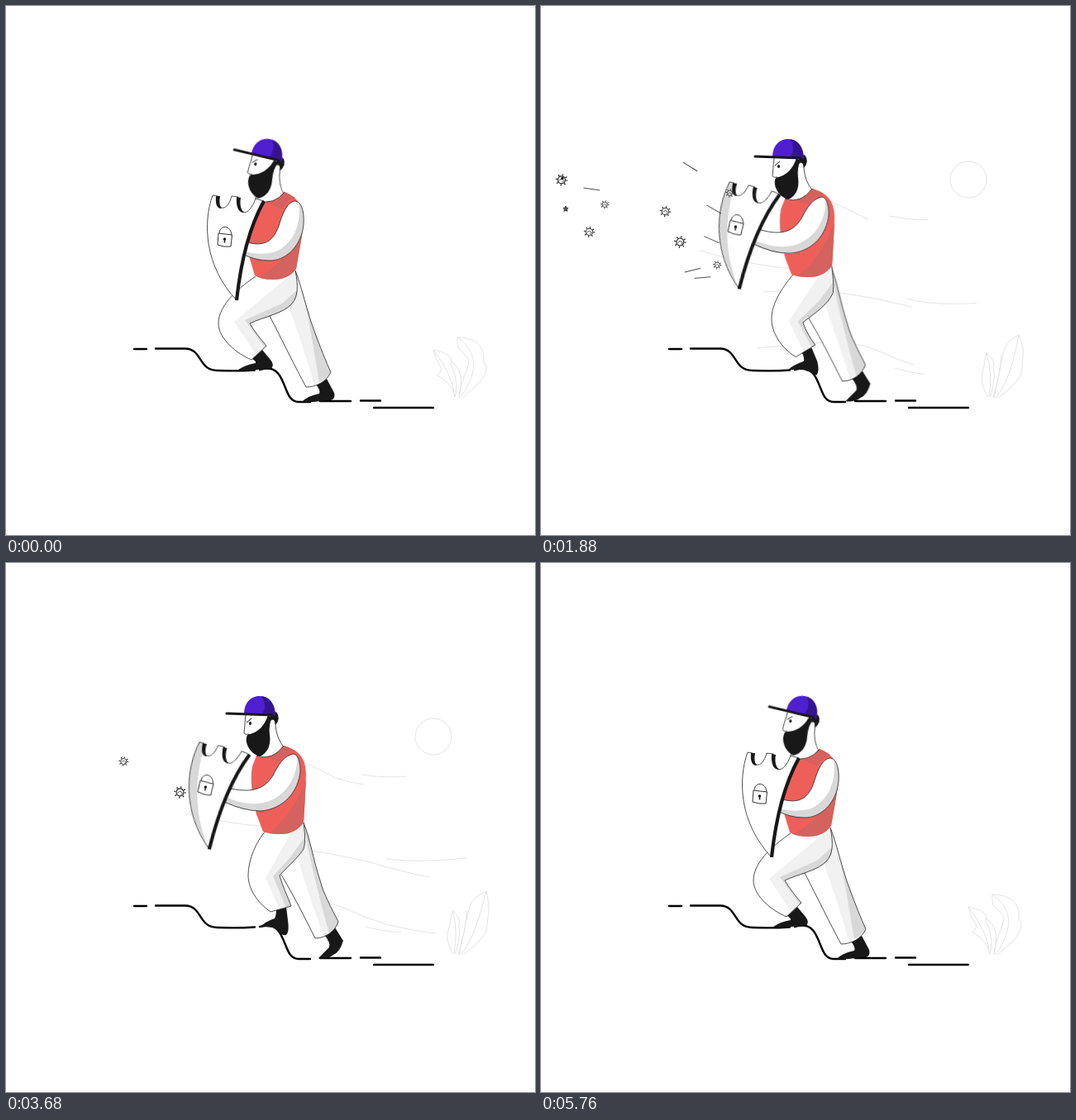
Animation, 640 px wide and 640 px high, one loop 5780 ms. Source, as an HTML page without scripts:

```html
<!DOCTYPE html>
<html lang="en">
<head>
<meta charset="utf-8">
<title>Shield bearer</title>
<style>
html, body { margin: 0; width: 100%; height: 100%; overflow: hidden; background: #fff; }
svg { display: block; width: 100%; height: 100%; }
path, line, circle { vector-effect: none; }

/* body parts morph between three poses: rest (a), lean (x), brace (d) */
.m, .hd, .sh, .legs, .top { animation: 5.78s ease-in-out infinite; }
.m { animation-name: morph; }
.hd { animation-name: head; transform-origin: 307px 172px; }
.sh { animation-name: shield; transform-origin: 264.5px 292.5px; }
.legs { animation-name: lean; --lean: -11.5px; }
.top { animation-name: lean; --lean: -9.5px; }
@keyframes morph {
  0%, 99.65%, 100% { d: var(--a); }
  25.26% { d: var(--x, var(--d)); }
  50.52%, 71.97% { d: var(--d); }
}
@keyframes lean {
  0%, 50.52%, 100% { transform: translate(0, 0); }
  25.26% { transform: translate(var(--lean), 0); }
}
@keyframes head {
  0%, 99.65%, 100% { transform: translate(10.5px, 0) rotate(11.5deg); }
  25.26% { transform: translate(-9.6px, 0) rotate(0deg); }
  50.52%, 71.97% { transform: translate(0, 0) rotate(0deg); }
}
@keyframes shield {
  0%, 99.65%, 100% { transform: translate(0, 0) rotate(0deg); }
  25.26% { transform: translate(-31.7px, -15.8px) rotate(7.9deg); }
  50.52%, 71.97% { transform: translate(-24.5px, -11px) rotate(7.7deg); }
}

/* background */
.faint { fill: none; stroke: #e4e4e4; stroke-width: 1; }
.leaf path { animation: sway 5.78s linear infinite; }
@keyframes sway {
  0%, 99.65%, 100% { d: var(--a); }
  18.7%, 78.9% { d: var(--x); }
  50.2% { d: var(--d); }
}
.wind path, .sun { stroke-dasharray: 100 200; }
.wind path { animation: wind 5.78s ease-in-out infinite; }
.sun { animation: sun 5.78s linear infinite; }
@keyframes wind {
  0% { stroke-dashoffset: 100; }
  50.5% { stroke-dashoffset: 0; }
  99.65%, 100% { stroke-dashoffset: -100; }
}
@keyframes sun {
  0%, 2.8% { stroke-dashoffset: 100; }
  21.5%, 77.5% { stroke-dashoffset: 0; }
  96.2%, 100% { stroke-dashoffset: -100; }
}

/* attackers: end at (x, y) after covering (w, h), starting at t */
.fly use { --w: 250; --s: 1; animation: fly 5.78s linear var(--t) infinite backwards; }
.fly .s { --w: 400; rotate: atan2(var(--h), var(--w)); }
@keyframes fly {
  0% { translate: calc((var(--x) - var(--w)) * 1px) calc((var(--y) - var(--h)) * 1px); }
  0%, 21.3% { scale: var(--s); }
  22%, 100% { translate: calc(var(--x) * 1px) calc(var(--y) * 1px); scale: 0; }
}

.ink { stroke: #222; stroke-width: .8; stroke-linejoin: round; }
.w { fill: #fff; }
.n { fill: none; }
.k { fill: #181818; }
.g1 { fill: #f1f1f1; }
.g2 { fill: #d8d8d8; }
.red { fill: #ef5f5a; }
.dim { fill: #d4625e; }
.ground { fill: none; stroke: #000; stroke-width: 2.4; stroke-linecap: round; }
</style>
</head>
<body>
<svg viewBox="0 0 640 640">
<defs>
  <g id="v" fill="none" stroke="#222">
    <circle r="4.5" stroke-width="1.1"/>
    <circle r="6.2" stroke-width="2.2" stroke-dasharray="1.2 3.67"/>
    <path d="M-3 1Q0-3 3 1M1 3L3 1" stroke-width=".9"/>
  </g>
  <path id="star" d="M0-3L1-1L3-1L1.4.6L2 3L0 1.6L-2 3L-1.4.6L-3-1L-1-1Z" fill="#666" stroke="#222"/>
  <circle id="dot" r="1.7" fill="#111"/>
  <line id="l" x1="-10" x2="10" stroke="#444" stroke-width=".9"/>
</defs>

<g class="faint leaf">
  <path style="--a:path('M543 473C540 460 532 452 522 447Q530 440 524 434Q519 425 517 416C534 420 541 424 538 434C544 444 547 460 543 473');--x:path('M541 473C533 462 528 452 529 445Q529 440 530 434Q529 425 531 415C540 421 548 427 545 436C549 447 547 462 543 473');--d:path('M540 473C536 460 536 452 540 445Q543 440 544 436Q546 430 549 426C550 431 553 433 550 440C551 450 546 462 544 473')"/>
  <path style="--a:path('M543 473Q540 445 517 416');--x:path('M542 473Q545 445 531 415');--d:path('M542 473Q549 450 549 426')"/>
  <path style="--a:path('M548 474Q556 440 538 430');--x:path('M547 474Q556 445 552 430');--d:path('M547 474Q555 450 563 412')"/>
  <path style="--a:path('M548 474C549 455 560 440 560 428Q552 418 547 414Q545 406 546 401C566 402 580 408 578 432Q584 434 579 446C572 460 560 465 553 474');--x:path('M548 474C550 455 556 442 555 432Q556 424 559 418Q558 408 564 400C574 408 584 414 579 430Q584 436 580 446C574 460 562 467 553 474');--d:path('M549 474C551 455 556 446 557 436Q562 424 563 412Q572 400 596 395C590 404 588 418 586 430Q582 436 582 444C574 458 562 467 553 474')"/>
  <path style="--a:path('M550 474C562 455 580 425 546 401');--x:path('M550 474C565 455 570 430 564 400');--d:path('M551 474C565 455 575 430 596 395')"/>
</g>
<path class="faint sun" pathLength="100" d="M517 188a22 22 0 0 0 0 44a22 22 0 0 0 0-44"/>
<g class="faint wind">
  <path pathLength="100" d="M300 214Q365 242 397 259Q415 266 433 268"/>
  <path pathLength="100" d="M421 254Q452 261 485 258"/>
  <path pathLength="100" d="M192 296Q280 322 360 320"/>
  <path pathLength="100" d="M269 346C340 340 390 350 444 363Q480 374 512 380"/>
  <path pathLength="100" d="M443 354Q480 365 557 357"/>
  <path pathLength="100" d="M261 414C330 408 370 400 410 418Q460 442 520 448"/>
  <path pathLength="100" d="M428 438Q450 445 478 447"/>
</g>

<path class="ground" d="M155 415H170M181 414.5H217C238 415 232 441 256 441Q280 442 301 440.5M307 440C318 437 325 438 331 447C340 461 340 479 354 479H368M380 478H417M429 477.5H453M445 486H517"/>

<!-- back leg -->
<g class="legs">
  <path class="m k" style="--a:path('M375 458L388 451L397 468Q399 475 393 477Q380 478 372 479Q365 479 358 479Q364 472 379 469Q381 465 375 458Z');--d:path('M386 451L398 441L408 457Q404 471 396 474Q391 478 386 478Q382 479 378 478Q384 472 391 465Q393 460 386 451Z')"/>
  <path class="m w" style="--a:path('M350 320C358 340 364 370 374 396C380 412 387 430 393 443C388 454 376 461 363 461C350 437 334 404 319 375L340 350Z');--d:path('M360 314C368 334 372 360 380 384C384 400 394 418 402 434C398 446 386 454 374 454C362 430 348 402 333 377L350 350Z')"/>
  <path class="m g1" style="--a:path('M338 352C350 385 362 420 373 459Q388 454 393 443C387 430 380 412 374 396C364 370 358 340 350 320Z');--d:path('M350 345C358 380 372 415 384 452Q398 446 402 434C394 418 384 400 380 384C372 360 368 334 360 314Z')"/>
  <path class="m g2" style="--a:path('M350 320C362 350 370 400 379 455Q390 449 393 443C387 430 380 412 374 396C364 370 358 340 350 320Z');--d:path('M360 314C365 350 378 400 391 448Q400 441 402 434C394 418 384 400 380 384C372 360 368 334 360 314Z')"/>
  <path class="m ink n" style="--a:path('M350 320C358 340 364 370 374 396C380 412 387 430 393 443C388 454 376 461 363 461C350 437 334 404 319 375');--d:path('M360 314C368 334 372 360 380 384C384 400 394 418 402 434C398 446 386 454 374 454C362 430 348 402 333 377')"/>
</g>

<!-- front leg -->
<path class="m k" style="--a:path('M298 427L310 416L320 428Q325 434 321 439Q311 440 302 440Q290 440 281 440Q290 434 302 432Q303 430 298 427Z');--x:path('M313 419L325 413L333 430Q336 442 332 446Q325 441 316 440Q306 440 297 440Q304 434 316 430Q318 426 313 419Z');--d:path('M327 419L339 416L341 432Q343 446 339 450Q333 452 326 442Q316 439 307 441Q313 434 325 430Q327 426 327 419Z')"/>
<path class="m w" style="--a:path('M302 327C286 338 257 360 257 384C257 403 280 421 297 428L315 411C308 403 300 393 295 384C312 376 336 372 346 360C353 352 354 340 350 320Z');--x:path('M304 324C293 337 276 358 276 379C276 398 292 418 306 425L329 409C323 402 317 393 314 384C328 373 346 363 352 347C353 336 351 326 350 314Z');--d:path('M314 324C303 337 293 358 293 378C293 397 308 414 320 422L345 415C341 404 334 390 331 378C340 368 354 356 360 346C363 336 361 324 360 314Z')"/>
<path class="m g1" style="--a:path('M340 329L276 382L303 422L315 411C308 403 300 393 295 384C312 376 336 372 346 360C353 352 354 340 350 320Z');--x:path('M335 326L297 381L315 418L329 409C323 402 317 393 314 384C328 373 346 363 352 347C353 336 351 326 350 314Z');--d:path('M345 326L314 381L331 419L345 415C341 404 334 390 331 378C340 368 354 356 360 346C363 336 361 324 360 314Z')"/>
<path class="m g2" style="--a:path('M352 344L334 360L289 380L313 413L315 411C308 403 300 393 295 384C312 376 336 372 346 360Q353 354 352 344Z');--x:path('M352 334L334 358L308 382L325 412L329 409C323 402 317 393 314 384C328 373 346 363 352 347Q352 340 352 334Z');--d:path('M361 332L344 356L323 379L339 417L345 415C341 404 334 390 331 378C340 368 354 356 360 346Q362 340 361 332Z')"/>
<path class="m ink n" style="--a:path('M302 327C286 338 257 360 257 384C257 403 280 421 297 428L315 411C308 403 300 393 295 384C312 376 336 372 346 360C353 352 354 340 350 320');--x:path('M304 324C293 337 276 358 276 379C276 398 292 418 306 425L329 409C323 402 317 393 314 384C328 373 346 363 352 347C353 336 351 326 350 314');--d:path('M314 324C303 337 293 358 293 378C293 397 308 414 320 422L345 415C341 404 334 390 331 378C340 368 354 356 360 346C363 336 361 324 360 314')"/>

<!-- neck sits under the vest -->
<path class="hd w ink" d="M319 192Q326 184 326 196Q327 212 337 224Q324 244 304 236L305 215Z"/>

<g class="top">
  <path class="m red" style="--a:path('M303 236Q325 241 337 225C352 230 361 243 360 262C358 282 354 300 351 318Q342 331 322 331Q308 331 301 326L295 306Q288 290 292 270Z');--d:path('M303 233Q322 240 336 221C354 226 363 236 363 256C362 280 361 300 360 314Q350 328 332 328Q318 328 311 325L303 304Q294 268 298 246Z')"/>
  <path class="m dim" style="--a:path('M359 268Q345 305 306 328Q314 331 322 331Q342 331 351 318C354 300 357 285 359 268Z');--d:path('M363 262Q345 308 318 327Q326 328 332 328Q350 328 360 314C361 300 362 280 363 262Z')"/>
  <path class="m dim" style="--a:path('M316 238Q330 237 337 225L350 232Q340 234 335 246Z');--d:path('M315 235Q328 233 336 221L350 227Q340 230 331 240Z')"/>
  <path class="m ink n" style="--a:path('M303 236Q325 241 337 225');--d:path('M303 233Q322 240 336 221')"/>
  <path class="m w" style="--a:path('M349 236C358 236 361 250 360 264C358 290 338 309 318 308Q302 308 286 300L292 286C314 292 324 283 330 266C335 250 340 238 349 236Z');--x:path('M347 231C354 231 356 242 356 252C354 276 336 298 308 299Q288 299 264 287L272 270C302 279 314 271 323 257C330 243 336 234 347 231Z');--d:path('M347 231C354 231 356 242 356 252C354 276 336 298 308 300Q288 300 264 289L272 273C302 279 314 271 323 257C330 243 336 234 347 231Z')"/>
  <path class="m g2" style="--a:path('M354 237C361 246 361 256 360 264C358 290 338 309 318 308Q302 308 286 300L288 297Q306 302 324 298C348 290 358 262 354 237Z');--d:path('M352 233C356 240 356 246 356 252C354 276 336 298 308 300Q288 300 264 289L268 284Q290 294 312 290C338 284 354 258 352 233Z')"/>
  <path class="m ink n" style="--a:path('M349 236C358 236 361 250 360 264C358 290 338 309 318 308Q302 308 286 300L292 286C314 292 324 283 330 266C335 250 340 238 349 236Z');--x:path('M347 231C354 231 356 242 356 252C354 276 336 298 308 299Q288 299 264 287L272 270C302 279 314 271 323 257C330 243 336 234 347 231Z');--d:path('M347 231C354 231 356 242 356 252C354 276 336 298 308 300Q288 300 264 289L272 273C302 279 314 271 323 257C330 243 336 234 347 231Z')"/>
</g>

<g class="hd">
  <path class="w ink" d="M290 183L288 206Q290 208 294 207L296 212L316 208L321 184Z"/>
  <path class="k" d="M320 184L327 180Q333 188 326 196Q325 186 319 191Z"/>
  <path class="k" d="M317 184C313 196 306 205 292 208C288 216 294 230 307 234C316 231 321 220 319 208C318 200 319 193 321 187Z"/>
  <ellipse class="k" cx="295.5" cy="194" rx="1.6" ry="2"/>
  <path class="n" stroke="#181818" d="M291 193L297 188"/>
  <path fill="#4f1fd0" d="M288 183C288 168 297 161 307 161C318 161 325 169 326 185Z"/>
  <path fill="#36148f" d="M309 161C318 162 326 170 326 185L309 184Q317 173 309 161Z"/>
  <path class="n" stroke="#181818" stroke-width="3.2" stroke-linecap="round" d="M267 182L322 184"/>
</g>

<g class="sh">
  <path class="w" d="M250 229L256 230C255 249 268 249 273 230L281 231C281 256 294 255 302 233L312 236C292 270 283 310 279 356C240 315 238 262 250 229Z"/>
  <path class="m g2" style="--a:path('M250 229C238 262 240 315 279 356C240 315 238 262 250 229Z');--d:path('M250 229C238 262 240 315 279 356C256 320 249 275 257 230Z')"/>
  <path class="n ink" d="M250 229L256 230C255 249 268 249 273 230L281 231C281 256 294 255 302 233L312 236C292 270 283 310 279 356C240 315 238 262 250 229Z"/>
  <path class="k" d="M254 230C253 243 257 245 261 245C258 241 258 236 259 230ZM279 231C278 246 283 250 288 250C283 245 283 238 284 232Z"/>
  <path class="n" stroke="#181818" stroke-width="4.2" d="M312 236C293 270 284 310 279 356"/>
  <path class="n" stroke="#333" stroke-linejoin="round" d="M257 275L273.500 277L272 291Q264 292 256 289ZM258 275C259 264 272 265 273 277"/>
  <path class="n" stroke="#222" stroke-width="1.6" d="M264.500 282V286.500"/>
  <circle class="k" cx="264.500" cy="282" r="1.7"/>
</g>

<g class="fly">
  <use href="#v" style="--x:236;--y:228;--h:54;--t:.648s;--s:.75"/>
  <use href="#v" style="--x:228;--y:286;--h:2;--t:.913s"/>
  <use href="#v" style="--x:225;--y:252;--h:30;--t:.24s;--s:.9"/>
  <use href="#v" style="--x:225;--y:284;--h:20;--t:-.05s;--s:.9"/>
  <use href="#v" style="--x:236;--y:245;--h:41;--t:1.683s"/>
  <use href="#star" style="--x:236;--y:294;--h:59;--t:1.658s"/>
  <use href="#v" style="--x:225;--y:258;--h:30;--t:1.361s;--s:.7"/>
  <use href="#v" style="--x:225;--y:280;--h:10;--t:1.457s;--s:.9"/>
  <use href="#v" style="--x:225;--y:262;--h:45;--t:.989s;--s:.9"/>
  <use href="#v" style="--x:248;--y:302;--w:400;--h:-130;--t:.72s;--s:.7"/>
  <use href="#v" style="--x:225;--y:278;--h:10;--t:2.483s"/>
  <use href="#v" style="--x:225;--y:265;--h:18;--t:2.005s;--s:.7"/>
  <use href="#dot" style="--x:232;--y:262;--h:65;--t:1.658s"/>
  <use href="#v" style="--x:225;--y:250;--h:30;--t:2.83s;--s:.8"/>

  <use href="#l" class="s" style="--x:215;--y:235;--h:80;--t:.126s"/>
  <use href="#l" class="s" style="--x:210;--y:279;--h:63;--t:-.052s"/>
  <use href="#l" class="s" style="--x:215;--y:218;--h:290;--t:-.116s"/>
  <use href="#l" class="s" style="--x:215;--y:299;--h:-145;--t:.467s"/>
  <use href="#l" class="s" style="--x:220;--y:300;--h:-187;--t:.521s"/>
  <use href="#l" class="s" style="--x:215;--y:243;--h:56;--t:1.098s"/>
  <use href="#l" class="s" style="--x:215;--y:216;--h:250;--t:.719s"/>
  <use href="#l" class="s" style="--x:225;--y:255;--h:230;--t:.66s"/>
  <use href="#l" class="s" style="--x:223;--y:290;--h:178;--t:.662s"/>
  <use href="#l" class="s" style="--x:222;--y:310;--h:-100;--t:.732s"/>
  <use href="#l" class="s" style="--x:225;--y:326;--h:-35;--t:.703s"/>
  <use href="#l" class="s" style="--x:215;--y:223;--h:42;--t:2.089s"/>
  <use href="#l" class="s" style="--x:215;--y:249;--h:-63;--t:2.283s"/>
  <use href="#l" class="s" style="--x:223;--y:280;--h:230;--t:1.662s"/>
  <use href="#l" class="s" style="--x:222;--y:310;--h:-100;--t:1.738s"/>
  <use href="#l" class="s" style="--x:220;--y:314;--h:-100;--t:2.012s"/>
</g>
</svg>
</body>
</html>
```
